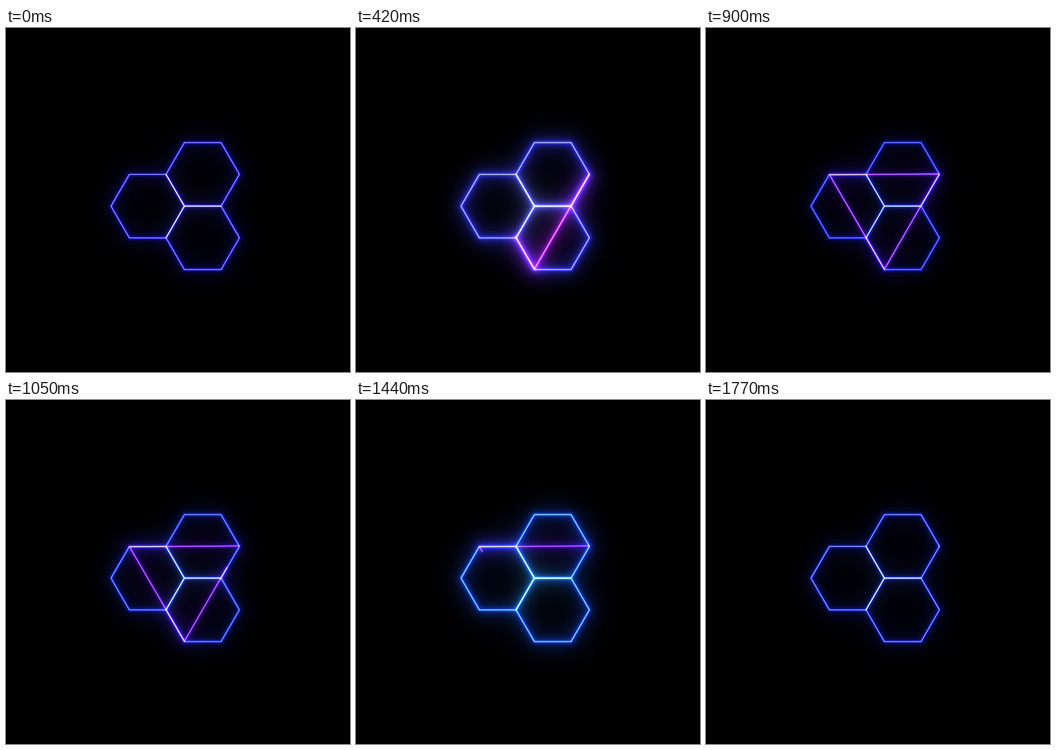
Animation, 480 px wide and 480 px high, one loop 1.8 s. Source, as an HTML page:

```html
<!DOCTYPE html>
<html lang="en">
<head>
<meta charset="utf-8">
<title>Neon hexagons</title>
<style>
  @property --tick { syntax: "<number>"; inherits: true; initial-value: 0; }

  html, body { margin: 0; width: 100%; height: 100%; overflow: hidden; background: #000; }
  svg { display: block; width: 100vw; height: 100vh; fill: none; background: #000; isolation: isolate; }

  /* overlapping light adds up, so shared edges shine brighter */
  .cell, .light { mix-blend-mode: plus-lighter; }

  .hue, .core, .halo, .violet, .beam, .trace, .beam-core { animation: 1.8s linear infinite; }
  .hue { stroke: currentColor; animation-name: hue; }
  .core { stroke-width: 1.3; animation-name: core; }
  .halo { animation-name: halo; }
  .violet { animation-name: violet; }

  .tight { stroke-width: 2.6; filter: blur(1.5px); opacity: .8; }
  .mid { stroke-width: 4; filter: blur(4px); opacity: .75; }
  .wide { stroke-width: 8; filter: blur(11px); opacity: .6; }
  .far { stroke-width: 8; filter: blur(25px); opacity: .5; }

  .beam { stroke: currentColor; animation-name: beam; }
  .beam .mid { opacity: .6; }
  .beam .tight { opacity: .6; }
  .beam-core { stroke-width: 1.5; animation-name: beam-core; }

  /* 60 ticks per loop: eased drawing for the first 30, eased erasing for the rest */
  .trace {
    --in: clamp(0, var(--tick) / 30, 1);
    --out: clamp(0, var(--tick) / 30 - 1, 1);
    --drawn: var(--in) * var(--in) * (3 - 2 * var(--in));
    --erased: var(--out) * var(--out) * (3 - 2 * var(--out));
    stroke-dasharray: 1 1.1;
    stroke-dashoffset: calc((1 - var(--drawn) - var(--erased)) * 1px);
    animation-name: tick;
    animation-timing-function: steps(60);
    animation-delay: -4ms;
  }

  @keyframes tick {
    from { --tick: 0; }
    to { --tick: 60; }
  }
  @keyframes hue {
    0% { color: #1c18ff; }
    23.33% { color: #3034ff; }
    36.67% { color: #2448ff; }
    50% { color: #1420ff; }
    73.33% { color: #1c48ff; }
    86.67% { color: #0a4cff; }
    98.33%, 100% { color: #1424ff; }
  }
  @keyframes core {
    0% { stroke: #8480ff; }
    23.33% { stroke: #9a9cff; }
    36.67% { stroke: #7c96ff; }
    50% { stroke: #6470ff; }
    73.33% { stroke: #7c98ff; }
    86.67% { stroke: #98bcff; }
    98.33%, 100% { stroke: #7c8aff; }
  }
  @keyframes halo {
    0% { opacity: .4; }
    23.33% { opacity: 1; }
    36.67% { opacity: .7; }
    50% { opacity: .35; }
    73.33% { opacity: .6; }
    86.67% { opacity: 1; }
    98.33%, 100% { opacity: .4; }
  }
  @keyframes violet {
    0% { opacity: .7; }
    20%, 100% { opacity: 0; }
  }
  @keyframes beam {
    0%, 23.33% { color: #a818e8; }
    36.67% { color: #9010f0; }
    50% { color: #5808f0; }
    73.33% { color: #5008d0; }
    86.67%, 100% { color: #4810d8; }
  }
  @keyframes beam-core {
    0%, 23.33% { stroke: #f078e8; }
    36.67% { stroke: #d870f0; }
    50% { stroke: #a060f0; }
    73.33% { stroke: #8840d8; }
    86.67%, 100% { stroke: #8850e8; }
  }
</style>
</head>
<body>
<svg viewBox="0 0 480 480">
  <defs>
    <path id="hex" d="M-25.6-44.3H25.6L51.2 0 25.6 44.3H-25.6L-51.2 0Z"/>
    <g id="cells">
      <use class="cell" href="#hex" x="274.5" y="204.2"/>
      <use class="cell" href="#hex" x="197.7" y="248.6"/>
      <use class="cell" href="#hex" x="274.5" y="292.8"/>
    </g>
    <path id="tri" pathLength="1" d="M325.6 203.6 249 336.4 172.4 205 325.6 203.6"/>
    <linearGradient id="side" gradientUnits="userSpaceOnUse" x1="235" y1="0" x2="326" y2="0">
      <stop stop-color="#6010ff" stop-opacity="0"/>
      <stop offset="1" stop-color="#8010f0"/>
    </linearGradient>
  </defs>

  <g class="light hue">
    <g class="halo">
      <g class="light far"><use href="#cells"/></g>
      <g class="light wide"><use href="#cells"/></g>
      <g class="light mid"><use href="#cells"/></g>
    </g>
    <g class="light tight"><use href="#cells"/></g>
  </g>
  <g class="light violet" stroke="url(#side)">
    <g class="mid"><use href="#cells"/></g>
  </g>
  <g class="light core"><use href="#cells"/></g>

  <g class="light beam">
    <g class="halo">
      <g class="light far"><use class="trace" href="#tri"/></g>
      <g class="light wide"><use class="trace" href="#tri"/></g>
      <g class="light mid"><use class="trace" href="#tri"/></g>
    </g>
    <g class="light tight"><use class="trace" href="#tri"/></g>
  </g>
  <g class="light beam-core"><use class="trace" href="#tri"/></g>
</svg>
</body>
</html>
```
